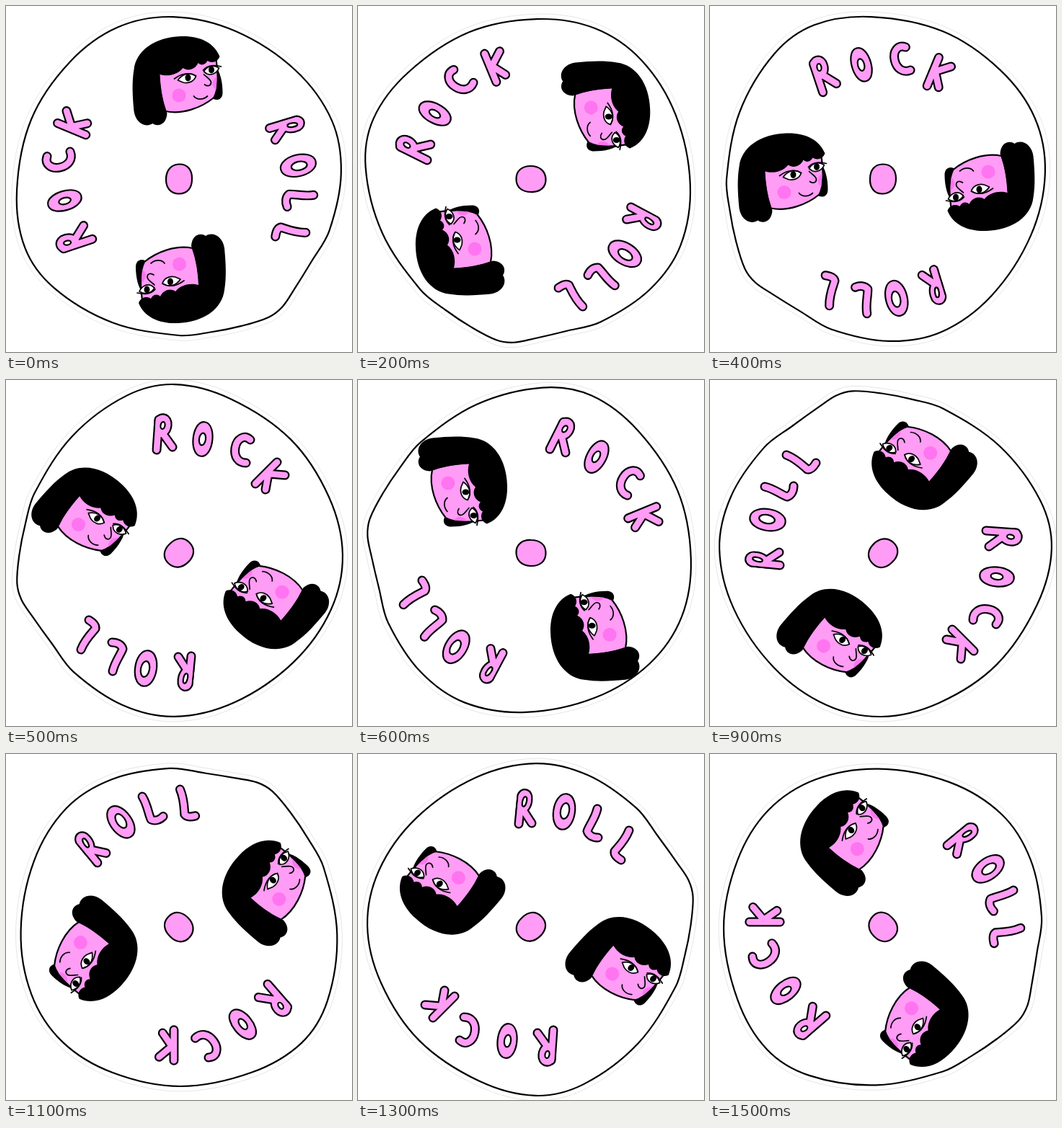
Write an HTML page that moves like this. It is 480 px wide and 480 px high and loops after 1600 ms.

```html
<!DOCTYPE html>
<html lang="en">
<head>
<meta charset="utf-8">
<title>Rock Roll</title>
<style>
  html, body { margin: 0; width: 100%; height: 100%; overflow: hidden; background: #fff; }
  svg { display: block; width: 100vw; height: 100vh; }
  .line { fill: none; stroke: #000; stroke-width: 2.2; stroke-linecap: round; stroke-linejoin: round; }
  .pink { fill: #ff9cf5; }
  .white { fill: #fff; }
  .rim { fill: #fff; stroke: #dedede; stroke-width: .7; }
  .tube { fill: none; stroke: currentColor; stroke-linecap: round; stroke-linejoin: round; }
  .edge { color: #000; stroke-width: 13; }
  .core { color: #ff9cf5; stroke-width: 8.6; }
  .solid { fill: currentColor; }
</style>
</head>
<body>
<svg viewBox="0 0 480 480" role="img" aria-label="Spinning record reading ROCK ROLL">
  <defs>
    <g id="head">
      <path d="M290 82C298 91 301 106 301 120C301 131 291 133 284 126Z"/>
      <path class="line pink" d="M212 90C213 112 216 130 222 146C245 151 272 141 289 127C295 116 296 98 291 68L240 60Z"/>
      <circle cx="240.500" cy="124" r="9.500" fill="#ff74f1"/>
      <path fill="#ff74f1" d="M293 98C286 102 285 112 292 116Z"/>
      <path d="M178 146C176 125 175 106 178 88C181 62 207 43 243 42C268 41 289 50 297 70C294 78 286 80 280 76C277 82 271 83 267 79C263 88 253 91 246 86C238 96 224 98 214 95C215 118 219 136 224 149C223 165 211 168 204 163C193 170 180 161 178 146Z"/>
      <g class="line" style="stroke-width:1.7">
        <path class="white" d="M239 103C245 94 255 91 264 97C262 104 255 108 246 106Z"/>
        <path d="M234 101C242 95 252 90 264 97"/>
        <path class="white" d="M275 91C279 83 288 81 296 86C293 93 286 97 279 94Z"/>
        <path d="M274 89C281 81 290 82 299 84"/>
        <path d="M275 95C279 99 285 102 285 106C285 111 280 112 276 109"/>
        <path d="M261 125C265 130.500 274 130.500 280 125"/>
      </g>
      <ellipse cx="253" cy="99.500" rx="4" ry="5"/>
      <ellipse cx="285.500" cy="88.500" rx="4" ry="5"/>
    </g>
    <g id="rock">
      <path d="M212 55L209 97M218 75L231 93"/>
      <path class="solid" d="M212 57C214 51 222 51 224 59C225 68 220 75 212 75Z"/>
      <ellipse class="solid" cx="273" cy="82" rx="8" ry="18.500" transform="rotate(6 273 82)"/>
      <path d="M339 83C330 75 320 82 318 94C316 106 322 115 333 115"/>
      <path d="M376 114L346 144M387 132L364 130L360 152"/>
    </g>
    <g id="roll">
      <path d="M227 58L223 97M230 79L241 96"/>
      <path class="solid" d="M227 58C229 52 237 54 236 62C236 70 232 77 225 79Z"/>
      <ellipse class="solid" cx="286" cy="80" rx="9.500" ry="19.500" transform="rotate(9 286 80)"/>
      <path d="M332 76C329 89 322 97 318 107C320 113 326 116 333 116"/>
      <path d="M376 106C371 119 363 127 356 135C355 140 360 144 365 147"/>
    </g>
  </defs>
  <g id="disc">
    <path id="rim" class="rim"/>
    <path id="ring" class="line" style="fill:#fff"/>
    <path id="hub" class="line pink" d="M240 219.500C252 219 258.500 228 258 240C258 252 252 260.500 240 260.500C228 260.500 222 252 222 240.500C222 228 229 220 240 219.500Z"/>
    <g transform="rotate(-112.500 240 240)">
      <use href="#rock" class="tube edge"/>
      <use href="#rock" class="tube core"/>
      <g class="line">
        <ellipse class="white" cx="217.500" cy="63" rx="3" ry="5" transform="rotate(12 217.500 63)"/>
        <ellipse class="white" cx="272.500" cy="82" rx="4.500" ry="8.500" transform="rotate(8 272.500 82)"/>
      </g>
    </g>
    <g transform="rotate(-292.500 240 240)">
      <use href="#roll" class="tube edge"/>
      <use href="#roll" class="tube core"/>
      <g class="line">
        <ellipse class="white" cx="231" cy="66" rx="2.800" ry="7" transform="rotate(14 231 66)"/>
        <ellipse class="white" cx="287" cy="79" rx="6" ry="11" transform="rotate(11 287 79)"/>
      </g>
    </g>
    <use id="top" href="#head"/>
    <use id="bottom" href="#head"/>
  </g>
</svg>
<script>
  const STEPS = 16, STEP_MS = 100;
  const $ = id => document.getElementById(id);

  // Uneven rim: angle clockwise from up, radius
  const RIM = [
    [-2, 225], [21, 219.5], [47, 221], [69, 227], [88, 225], [109, 220.5],
    [122, 216.5], [134, 221.5], [141, 228], [147, 228.5], [157, 221.5],
    [168, 217], [180, 217], [205, 219.5], [229, 230], [246, 234],
    [266, 225.5], [292, 221], [317, 222], [338, 227]
  ];

  // Closed smooth curve through the rim points, pushed out by pad
  function rimPath(pad) {
    const pts = RIM.map(([deg, r]) => {
      const a = deg * Math.PI / 180;
      return [240 + (r + pad) * Math.sin(a), 240 - (r + pad) * Math.cos(a)];
    });
    const n = pts.length, at = i => pts[(i + n) % n];
    // Handle length follows the span, so uneven spacing stays smooth
    const handle = (i, j) => {
      const [p, q, s] = [at(i - 1), at(i), at(i + 1)];
      const len = Math.hypot(at(j)[0] - q[0], at(j)[1] - q[1]) / 3;
      const k = (j > i ? 1 : -1) * len / Math.hypot(s[0] - p[0], s[1] - p[1]);
      return [q[0] + (s[0] - p[0]) * k, q[1] + (s[1] - p[1]) * k];
    };
    let d = "M" + pts[0];
    for (let i = 0; i < n; i++) d += "C" + [handle(i, i + 1), handle(i + 1, i), at(i + 1)].join(" ");
    return d + "Z";
  }

  function spin(id, angle) {
    $(id).setAttribute("transform", `rotate(${angle} 240 240)`);
  }

  function placeHead(id, x, y, turn, dx, dy) {
    $(id).setAttribute("transform",
      `translate(${x} ${y}) rotate(${turn}) translate(${dx - 269} ${dy - 94})`);
  }

  // Heads and hub turn once more on their own while the disc carries them
  function draw(ms) {
    const angle = Math.floor(ms / STEP_MS) % STEPS * 360 / STEPS;
    spin("disc", angle);
    spin("hub", angle);
    placeHead("top", 250, 104, angle, 18.5, -10);
    placeHead("bottom", 240, 376.5, angle + 180, 28, -11.5);
  }

  $("rim").setAttribute("d", rimPath(7));
  $("ring").setAttribute("d", rimPath(0));

  const start = performance.now();
  function tick() {
    draw(performance.now() - start);
    requestAnimationFrame(tick);
  }
  tick();
</script>
</body>
</html>
```
